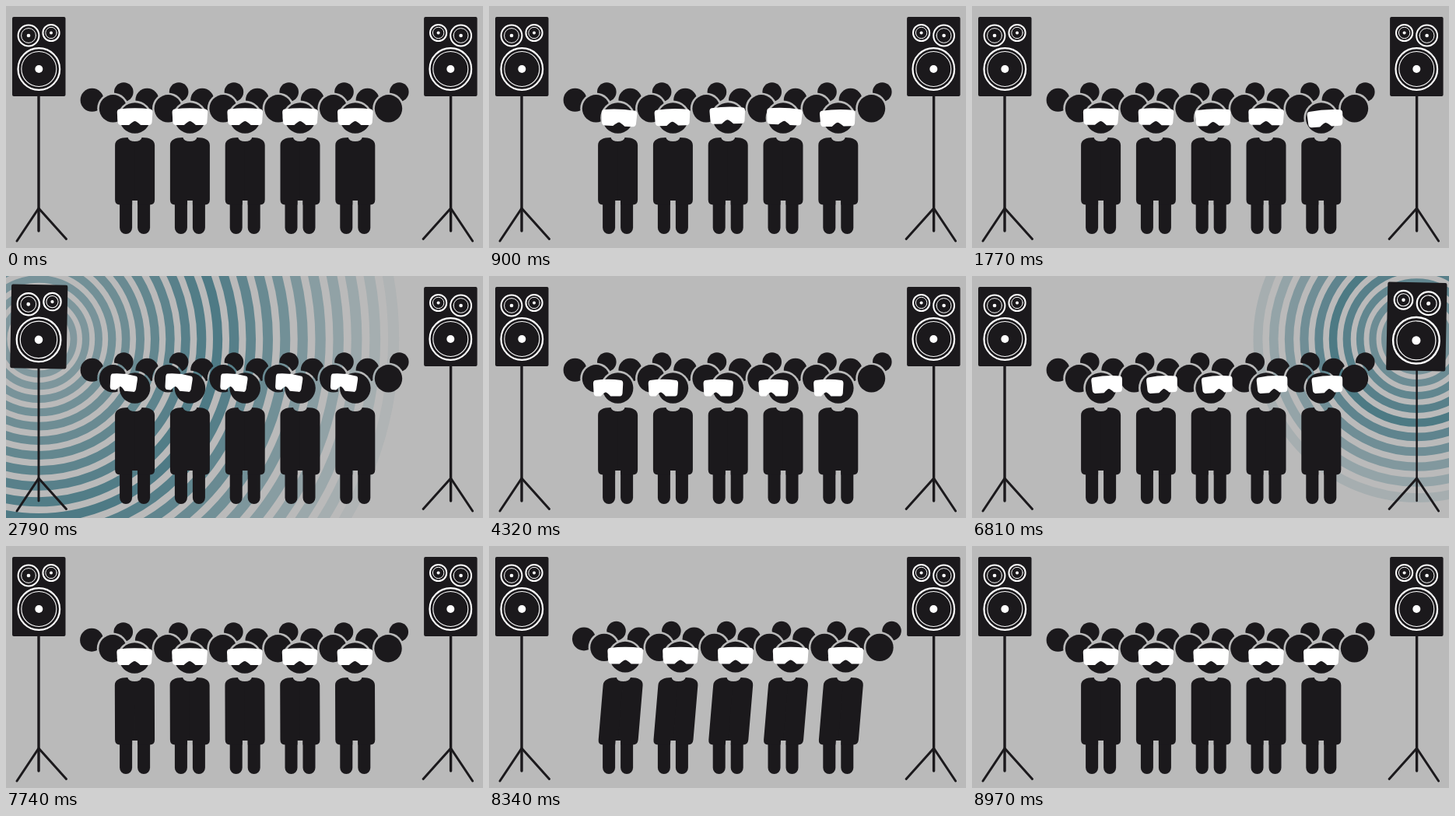
An HTML page with a canvas for the animation above (9 s loop, 613x311 px).

```html
<!DOCTYPE html>
<html lang="en">
<head>
<meta charset="utf-8">
<title>Crowd between two speakers</title>
<style>
html, body { margin: 0; width: 100%; height: 100%; overflow: hidden; background: #bababa; }
canvas { display: block; }
</style>
</head>
<body>
<canvas width="613" height="311"></canvas>
<script>
const stage = document.querySelector('canvas').getContext('2d');
const layer = stage.canvas.cloneNode().getContext('2d');
const BG = '#bababa', INK = '#1b191c', TEAL = '#4d7a85', TAU = Math.PI * 2;
const LOOP = 9000, BLAST = 1000, LEFT_BLAST = 2000, RIGHT_BLAST = 6380;
const FIRST = 165.6, STEP = 70.8, HIP = 256, PEOPLE = 5;
let g = stage;

const clamp = v => Math.max(0, Math.min(1, v));

function ease(t, from, to) {
  const u = clamp((t - from) / (to - from));
  return u * u * (3 - 2 * u);
}

// Rises from a to b, holds, falls from c to d.
const pulse = (t, a, b, c, d) => ease(t, a, b) - ease(t, c, d);

function disc(x, y, r, color) {
  g.fillStyle = color;
  g.beginPath();
  g.arc(x, y, r, 0, TAU);
  g.fill();
}

function ring(x, y, r, width, color) {
  g.strokeStyle = color;
  g.lineWidth = width;
  g.beginPath();
  g.arc(x, y, r, 0, TAU);
  g.stroke();
}

function box(x, y, w, h, radii) {
  g.fillStyle = INK;
  g.beginPath();
  g.roundRect(x, y, w, h, radii);
  g.fill();
}

function line(width, ...pts) {
  g.strokeStyle = INK;
  g.lineWidth = width;
  g.lineCap = 'round';
  g.beginPath();
  for (const [x, y] of pts) g.lineTo(x, y);
  g.stroke();
}

// Draws one half of a shape on both sides of x = 0.
function bothSides(half) {
  for (const side of [-1, 1]) {
    g.save();
    g.scale(side, 1);
    half();
    g.restore();
  }
}

function mirrored(draw, u) {
  g.save();
  g.translate(613.6, 0);
  g.scale(-1, 1);
  draw(u);
  g.restore();
}

const reach = age => .1145 * Math.pow(age, 1.25);

function waves(u) {
  if (u <= 0 || u >= BLAST) return;
  const gap = 32, front = reach(u), fade = clamp((BLAST - u) / 150);
  for (let age = u; age > 0; age -= gap) {
    const r = reach(age), f = r / front;
    g.globalAlpha = fade * Math.min(1, .4 + 1.25 * f, (1 - f) * 1.9);
    ring(42, 81, r, .58 * gap * 1.25 * r / age, TEAL);
  }
  g.globalAlpha = 1;
}

function cone(x, y, r, inner, dot, width) {
  ring(x, y, r, width, '#fff');
  ring(x, y, inner, width / 2, '#fff');
  disc(x, y, dot, '#fff');
}

function speaker(u) {
  const shake = u > 0 ? clamp((BLAST - u) / 150) : 0, beat = u / 249 * TAU;
  const size = 1 + .1 * shake * (1 - Math.cos(beat));
  line(3.4 - 8 * (size - 1), [42, 116], [42, 289]);
  line(3, [14, 302], [42, 260], [77.5, 299.5]);
  g.save();
  g.translate(42, 65);
  g.scale(size, size);
  g.rotate(.02 * shake * Math.sin(beat));
  g.translate(-42, -65);
  box(8, 14, 68.5, 102, 2);
  cone(29, 38, 13.4, 9.4, 2.3, 2);
  cone(58, 34.5, 10.6, 7.2, 2, 2);
  cone(42.3, 81, 26.8, 22.5, 5, 2.2);
  g.restore();
}

function torsoHalf() {
  g.fillStyle = INK;
  g.beginPath();
  g.moveTo(-.4, 174);
  g.quadraticCurveTo(8, 174, 9, 169);
  g.bezierCurveTo(19, 169, 25.5, 172, 25.5, 179);
  g.lineTo(25.5, 249);
  g.quadraticCurveTo(25.5, 255.5, 19, 255.5);
  g.lineTo(3.5, 255.5);
  g.lineTo(3.5, 250);
  g.lineTo(-.4, 250);
  g.fill();
}

function body(x, lean) {
  g.save();
  g.translate(x, 0);
  bothSides(() => box(3.5, 248, 16, 45, [0, 0, 8, 8]));
  g.transform(1, 0, -lean, 1, lean * HIP, 0);
  bothSides(torsoHalf);
  g.restore();
}

// A head cuts a gap into whatever stands behind it.
function head(x, y, r) {
  g.globalCompositeOperation = 'destination-out';
  disc(x, y, r + 2.6, INK);
  g.globalCompositeOperation = 'source-over';
  disc(x, y, r, INK);
}

function goggles(x, y, deg, width, nose) {
  g.save();
  g.translate(x, y);
  g.rotate(deg * Math.PI / 180);
  g.scale(width, 1);
  g.fillStyle = '#fff';
  g.beginPath();
  g.moveTo(-20, -9.5);
  g.quadraticCurveTo(0, -12, 20, -9.5);
  g.quadraticCurveTo(23, -9, 22.8, -5);
  g.lineTo(22, 7);
  g.quadraticCurveTo(21.5, 11, 18, 11);
  g.lineTo(nose + 7.5, 11);
  g.quadraticCurveTo(nose + 2, 6, nose, 6);
  g.quadraticCurveTo(nose - 2, 6, nose - 7.5, 11);
  g.lineTo(-18, 11);
  g.quadraticCurveTo(-21.5, 11, -22, 7);
  g.lineTo(-22.8, -5);
  g.quadraticCurveTo(-23, -9, -20, -9.5);
  g.fill();
  g.restore();
}

// Dance at the end: one and a half swings that grow and quicken.
function swayAt(t) {
  const u = clamp((t - 7710) / 1260);
  return -27 * Math.min(1, .3 + 1.2 * u) * Math.sin(1.5 * TAU * Math.pow(u, 1.357));
}

function crowd(t) {
  const sway = swayAt(t), lean = sway / 150, lift = Math.abs(sway) / 9;
  const shift = y => lean * (HIP - y);

  const turn = pulse(t, 6600, 7000, 7350, 7680) - pulse(t, 2250, 2600, 4320, 4950);
  const jolt = pulse(t, 6600, 7000, 7250, 7500) - pulse(t, 2250, 2600, 3000, 3450);
  const nod = pulse(t, 5000, 5700, 6200, 6700);
  const glance = pulse(t, 900, 1770, 1780, 2250);
  const restless = pulse(t, 0, 300, 1900, 2200) + pulse(t, 4300, 4700, 6300, 6600);
  const roam = 2 * restless * Math.sin((t - 1770) / 1310 * TAU);
  const dx = 12.5 * turn + 2 * jolt + 3 * nod;
  const dy = 1.5 * Math.abs(turn) - 7 * Math.abs(jolt) + 4 * nod;
  const width = 1 - .16 * Math.abs(turn) - .08 * Math.abs(jolt);

  const row = (x, y, r, count) => {
    for (let i = 0; i < count; i++) head(x + i * STEP + shift(y), y - lift, r);
  };
  row(151.3, 110.5, 12.3, PEOPLE + 1);
  row(110.6, 120.8, 15, PEOPLE + 1);
  row(137.5, 131.8, 17.7, PEOPLE + 1);
  row(FIRST, 144, 19.8, PEOPLE);

  for (let i = 0; i < PEOPLE; i++) {
    const x = FIRST + i * STEP, side = Math.cos(i * 2.1);
    const eager = i % 2 ? 0 : glance * i / (PEOPLE - 1);
    body(x, lean);
    goggles(
      x + shift(142) + dx + 5 * eager + roam * side,
      142 - lift + dy + 2 * eager + roam * Math.sin(i * 1.7 + 1),
      glance - 5 * eager - 6 * jolt - 3 * nod + 1.5 * roam * side,
      width, dx * .3);
  }
}

function frame(now) {
  const t = now % LOOP, left = t - LEFT_BLAST, right = t - RIGHT_BLAST;
  g = layer;
  g.clearRect(0, 0, 613, 311);
  crowd(t);
  g = stage;
  g.fillStyle = BG;
  g.fillRect(0, 0, 613, 311);
  waves(left);
  mirrored(waves, right);
  speaker(left);
  mirrored(speaker, right);
  g.drawImage(layer.canvas, 0, 0);
  requestAnimationFrame(frame);
}
requestAnimationFrame(frame);
</script>
</body>
</html>
```
